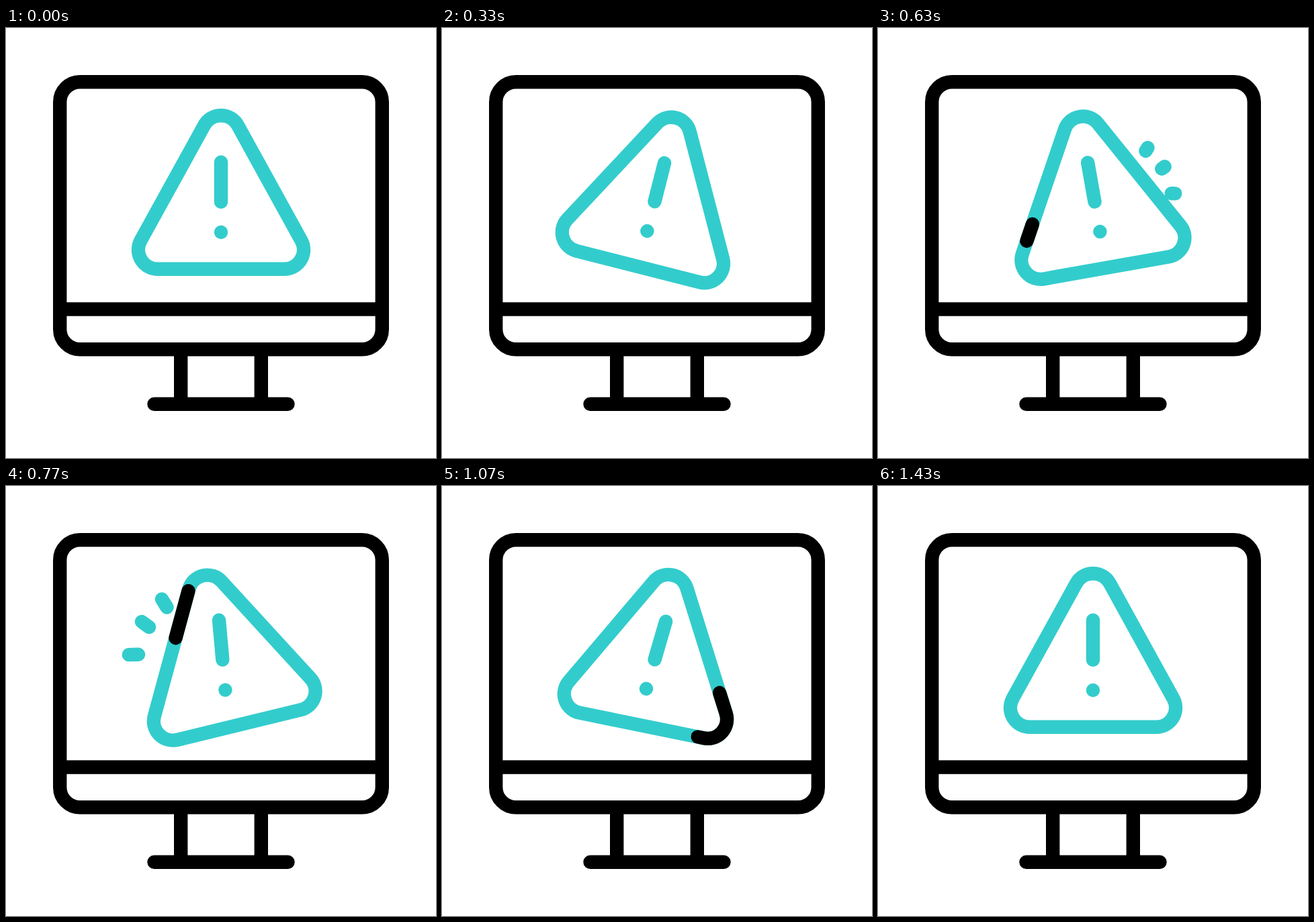
Write an HTML page that moves like this. It is 640x640 px and loops after 1670 ms.

```html
<!DOCTYPE html>
<html lang="en">
<head>
<meta charset="utf-8">
<title>Monitor warning</title>
<style>
  html, body { margin: 0; height: 100%; overflow: hidden; background: #fff; }
  svg { display: block; width: 100vw; height: 100vh; }
  g { fill: none; stroke: #000; stroke-width: 20.4; stroke-linecap: round; }
  .accent { stroke: #33cccc; }
</style>
</head>
<body>
<svg viewBox="0 0 640 640">
  <defs>
    <path id="outline" d="M200.6 316.2 L295 144.9 A28.6 28.6 0 0 1 345 144.9 L439.4 316.2
      A28.6 28.6 0 0 1 414.4 358.7 H225.6 A28.6 28.6 0 0 1 200.6 316.2 Z"/>
  </defs>
  <g>
    <rect x="80.2" y="80.2" width="479.6" height="398.1" rx="29.9"/>
    <path d="M80.2 418.5 H559.8 M260.2 478.3 V559.7 M379.8 478.3 V559.7 M220.5 559.7 H419.5"/>
  </g>
  <g class="accent">
    <path id="leftRays"/>
    <path id="rightRays" transform="translate(614 20.5) scale(-.9 .9)" stroke-width="22.7"/>
  </g>
  <g id="sign">
    <use href="#outline" class="accent"/>
    <use href="#outline" id="glow"/>
    <path id="mark" class="accent" d="M320 199.7 V258.8 M320 304 h0.01"/>
  </g>
</svg>
<script>
const LOOP = 1670, FRAME = 1000 / 30;
const SWING = 15, TURNS = [4, 11, 21.9, 30, 39, 43];
const RAYS = [[239.5, 180.5, -22, -35], [213, 210, -32, -23], [197, 250.8, -41, 1]];
const $ = id => document.getElementById(id);

const progress = (f, from, to) => Math.min(1, Math.max(0, (f - from) / (to - from)));
const ease = (f, from, to) => (1 - Math.cos(Math.PI * progress(f, from, to))) / 2;
const pulse = (f, from, peak, to) => ease(f, from, peak) - ease(f, peak, to);

// Rocks between +SWING and -SWING, reversing at each turn and resting at both ends
function swing(f) {
  const peaks = TURNS.slice(1, -1);
  return peaks.reduce((angle, _, i) =>
    angle + (i % 2 ? -SWING : SWING) * pulse(f, ...TURNS.slice(i, i + 3)), 0);
}

// A dash that runs once round the sign, longest halfway
function drawGlow(f) {
  const u = progress(f, 17, 42);
  const length = 106 * Math.sin(Math.PI * u);
  const centre = 813 * u - 25.5 - 13 * Math.sin(2 * Math.PI * u);
  const style = $("glow").style;
  style.visibility = u > 0 && u < 1 ? "visible" : "hidden";
  style.strokeDasharray = `${length} 2000`;
  style.strokeDashoffset = length / 2 - centre;
}

function drawRays(id, growth) {
  $(id).setAttribute("d", growth > 0.001 ? RAYS.map(([x, y, dx, dy]) =>
    `M${x} ${y} l${dx * growth} ${dy * growth}`).join("") : "");
}

function draw(now) {
  const f = Math.floor((now % LOOP + 3.4) / FRAME);
  $("sign").setAttribute("transform", `rotate(${swing(f)} 320 244.5)`);
  $("mark").setAttribute("transform", `rotate(${9.4 * pulse(f, 19, 24, 40)} 320 251.7)`);
  drawGlow(f);
  drawRays("rightRays", pulse(f, 11, 15.5, 20.2));
  drawRays("leftRays", pulse(f, 21, 26, 31));
}

const start = performance.now();
function tick() {
  draw(performance.now() - start);
  requestAnimationFrame(tick);
}
tick();
</script>
</body>
</html>
```
